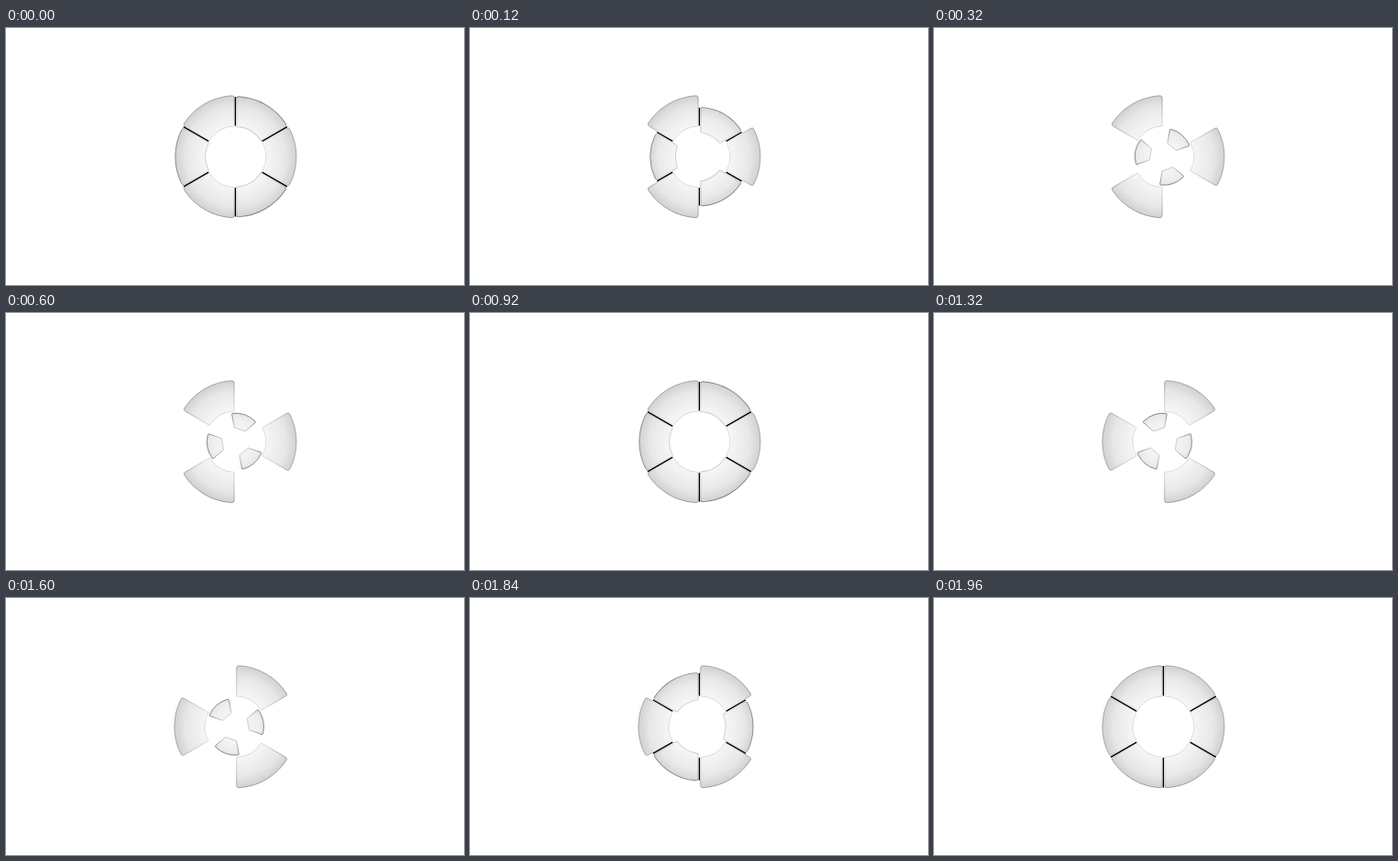
An HTML page with a canvas that plays this animation: 500x280 px, repeating every 2000 ms.

```html
<!DOCTYPE html>
<html lang="en">
<head>
<meta charset="utf-8">
<title>Ring loader</title>
<style>
html, body { margin: 0; width: 100%; height: 100%; overflow: hidden; background: #fff; }
canvas { display: block; }
</style>
</head>
<body>
<canvas id="stage" width="500" height="280"></canvas>
<script>
const ctx = document.getElementById('stage').getContext('2d');
const CX = 250.4, CY = 140.2, INNER = 33.3, OUTER = 66.6;
const STEP = 40, LOOP = 2000, HALF = 1000;
const MIN_SCALE = 0.45, GAP = 1.3;
const DEG = Math.PI / 180;

const clamp = x => Math.min(1, Math.max(0, x));
const smooth = x => { x = clamp(x); return x * x * (3 - 2 * x); };
const point = (r, a) => [r * Math.cos(a), r * Math.sin(a)];

// Radial shading; stops are [offset, colour] pairs.
function shade(s, stops) {
  const g = ctx.createRadialGradient(0, 0, INNER * s, 0, 0, OUTER * s);
  for (const [at, colour] of stops) g.addColorStop(at, colour);
  return g;
}

// One 60 degree piece around angle 0; the inner edge flattens as it shrinks.
function segmentPath(s, small) {
  const r0 = INNER * s, r1 = OUTER * s, soft = 2.6 * s;
  const gap = GAP + 0.4 * small;
  const edge = r => Math.PI / 6 - Math.asin(gap / r);
  const a0 = edge(r0), a1 = edge(r1), a2 = a1 - soft / r1;
  const side = edge(r1 - soft);
  const bend = r0 / Math.cos(a0) * (1 - small) + r0 * Math.cos(a0) * small;
  ctx.beginPath();
  ctx.moveTo(...point(r0, a0));
  ctx.quadraticCurveTo(bend, 0, ...point(r0, -a0));
  ctx.lineTo(...point(r1 - soft, -side));
  ctx.quadraticCurveTo(...point(r1, -a1), ...point(r1, -a2));
  ctx.arc(0, 0, r1, -a2, a2);
  ctx.quadraticCurveTo(...point(r1, a1), ...point(r1 - soft, side));
  ctx.closePath();
}

function segment(angle, s) {
  const small = (1 - s) / (1 - MIN_SCALE);
  const grey = v => {
    const c = Math.round(v + (243 - v) * 0.6 * small);
    return `rgb(${c},${c},${c})`;
  };
  ctx.save();
  ctx.rotate(angle * DEG);
  segmentPath(s, small);
  ctx.fillStyle = shade(s, [[0, grey(246)], [0.65, grey(231)], [1, grey(209)]]);
  ctx.fill();
  ctx.strokeStyle = shade(s, [[0, 'rgba(60,60,60,0.25)'], [1, 'rgba(60,60,60,0.6)']]);
  ctx.lineWidth = s < 1 ? 0.9 : 0.6;
  ctx.stroke();
  ctx.restore();
}

function radialLines(from, to, width, style) {
  ctx.strokeStyle = style;
  ctx.lineWidth = width;
  ctx.beginPath();
  for (let a = 30; a < 390; a += 60) {
    ctx.moveTo(...point(from, a * DEG));
    ctx.lineTo(...point(to, a * DEG));
  }
  ctx.stroke();
}

// Dark seams wherever neighbouring pieces still face each other.
function seams(s) {
  const end = OUTER * s - 0.3;
  if (end <= INNER + 1) return;
  radialLines(INNER, end, 3.4, shade(1, [[0, '#f4f4f4'], [0.65, '#e7e7e7'], [1, '#d1d1d1']]));
  radialLines(INNER + 0.4, end, 1.4, '#000');
}

function draw(ms) {
  const t = (Math.floor(ms / STEP) * STEP + STEP) % LOOP;
  const second = t >= HALF;
  const u = (t % HALF) / HALF;
  const scale = 1 - (1 - MIN_SCALE) * smooth(Math.min(u, 1 - u) / 0.4);
  const turn = 120 * smooth((u - 0.28) / 0.44);
  const moving = second ? 0 : 60;

  ctx.fillStyle = '#fff';
  ctx.fillRect(0, 0, 500, 280);
  ctx.save();
  ctx.translate(CX, CY);
  for (let a = 0; a < 360; a += 120) {
    segment(60 - moving + a, 1);
    segment(moving + a + turn, scale);
  }
  seams(scale);
  ctx.restore();
}

let start = null;
function frame(now) {
  if (start === null) start = now;
  draw(Math.max(0, now - start) % LOOP);
  requestAnimationFrame(frame);
}
draw(0);
requestAnimationFrame(frame);
</script>
</body>
</html>
```
